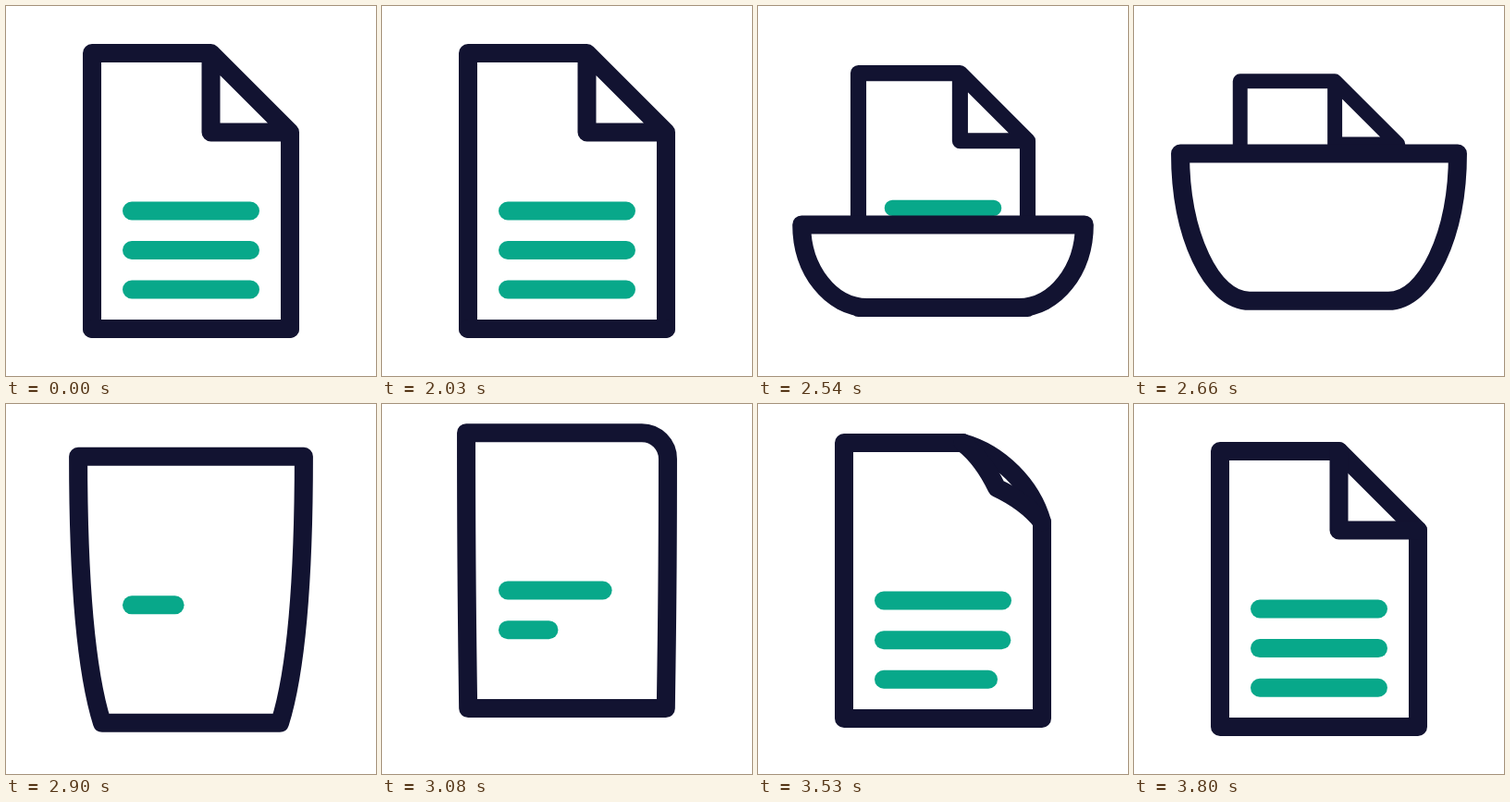
These frames come from a looping animation (400x400 px, 3.89 s). An HTML page:

```html
<!DOCTYPE html>
<html lang="en">
<head>
<meta charset="utf-8">
<title>Turning page</title>
<style>
  html, body { margin: 0; width: 100%; height: 100%; overflow: hidden; background: #fff; }
  svg { display: block; width: 100vw; height: 100vh; }
  path { fill: none; stroke: #121331; stroke-width: 20; stroke-linecap: round; stroke-linejoin: round; }
  .line { stroke: #08a88a; }
  #sheet { fill: #fff; }
</style>
</head>
<body>
<svg viewBox="0 0 400 400">
  <g id="back">
    <path class="line" d="M136 221.5H264M136 264H264M136 306.5H264"/>
    <path d="M93 51H221.5L307 136.5V349H93ZM221.5 51V136.5H307"/>
  </g>
  <g id="front">
    <path id="sheet"/>
    <path id="fold"/>
    <path class="line"/>
    <path class="line"/>
    <path class="line"/>
  </g>
</svg>
<script>
const LOOP = 3890;
const $ = id => document.getElementById(id);
const back = $('back'), front = $('front'), sheet = $('sheet'), fold = $('fold');
const lines = front.querySelectorAll('.line');

// Monotone cubic interpolation through [time, value] keys, at rest at both ends.
function track(...keys) {
  const secant = i => (keys[i + 1][1] - keys[i][1]) / (keys[i + 1][0] - keys[i][0]);
  const slopes = keys.map((_, i) => {
    if (i === 0 || i === keys.length - 1) return 0;
    const a = secant(i - 1), b = secant(i);
    return a * b > 0 ? 2 * a * b / (a + b) : 0;
  });
  return t => {
    if (t <= keys[0][0]) return keys[0][1];
    const n = keys.findIndex(k => k[0] > t);
    if (n < 0) return keys[keys.length - 1][1];
    const [t0, v0] = keys[n - 1], [t1, v1] = keys[n];
    const d = t1 - t0, p = (t - t0) / d, q = 1 - p;
    return v0 * q * q * (1 + 2 * p) + v1 * p * p * (3 - 2 * p)
      + d * p * q * (slopes[n - 1] * q - slopes[n] * p);
  };
}

const backScale = track([2030, 1], [2390, .942], [2660, .797], [2850, .78]);
const topY = track([2030, 349], [2190, 353], [2390, 320], [2660, 160], [2900, 61], [3100, 51]);
const topHalf = track([2030, 107], [2390, 139], [2555, 153], [2660, 150], [2900, 122], [3080, 109], [3160, 107]);
const bottomY = track([2030, 349], [2390, 340.4], [2650, 318.7], [2900, 349]);
const bottomHalf = track([2030, 107], [2390, 95], [2660, 75], [2900, 96], [3100, 107]);
const sideLift = track([2660, 0], [2900, 45], [3080, 90]);
const lift = track([2800, 0], [3180, -24], [3780, 0]);
const cornerSize = track([2920, 0], [3340, 85.5]);
const foldAmount = track([3360, 0], [3760, 1]);
const lineStarts = [2810, 2995, 3199];

const mix = (a, b, p) => a + (b - a) * p;

// Rounded corner of size r, bent by p towards a tip lying `depth` corner sizes inside.
function corner(x, y, r, p, depth) {
  const tip = r * mix(.293, depth, p);
  const near = r * mix(.586, (1 + depth) / 2, p);
  const side = r * mix(0, depth / 2, p);
  return `Q${x - near} ${y + side} ${x - tip} ${y + tip}` +
         `Q${x - side} ${y + near} ${x} ${y + r}`;
}

function draw(t) {
  const s = backScale(t);
  back.setAttribute('transform', `translate(200 200) scale(${s}) translate(-200 -200)`);
  back.style.display = t < 2850 ? '' : 'none';

  const y = topY(t), w = topHalf(t), b = bottomY(t), h = bottomHalf(t), v = sideLift(t);
  const r = cornerSize(t), p = foldAmount(t);
  const right = 200 + w, left = 200 - w;
  const bend = .55 * (w - h);
  const start = y + r;
  sheet.setAttribute('d',
    `M${left} ${y}H${right - r}${corner(right, y, r, p, .5)}` +
    `C${right} ${mix(start, b, .55)} ${200 + h + bend} ${b - v} ${200 + h} ${b}H${200 - h}` +
    `C${200 - h - bend} ${b - v} ${left} ${mix(y, b, .55)} ${left} ${y}Z`);
  fold.setAttribute('d', p > 0 ? `M${right - r} ${y}${corner(right, y, r, p, 1)}` : '');

  lines.forEach((line, i) => {
    const q = Math.min(1, (t - lineStarts[i]) / 650);
    const ly = 221.5 + 42.6 * i;
    line.setAttribute('d', q > 0 ? `M136 ${ly}H${136 + 128 * (1 - (1 - q) ** 3)}` : '');
  });
  front.setAttribute('transform', `translate(0 ${lift(t)})`);
}

const begin = performance.now();
function tick() {
  draw((performance.now() - begin) % LOOP);
  requestAnimationFrame(tick);
}
tick();
</script>
</body>
</html>
```
